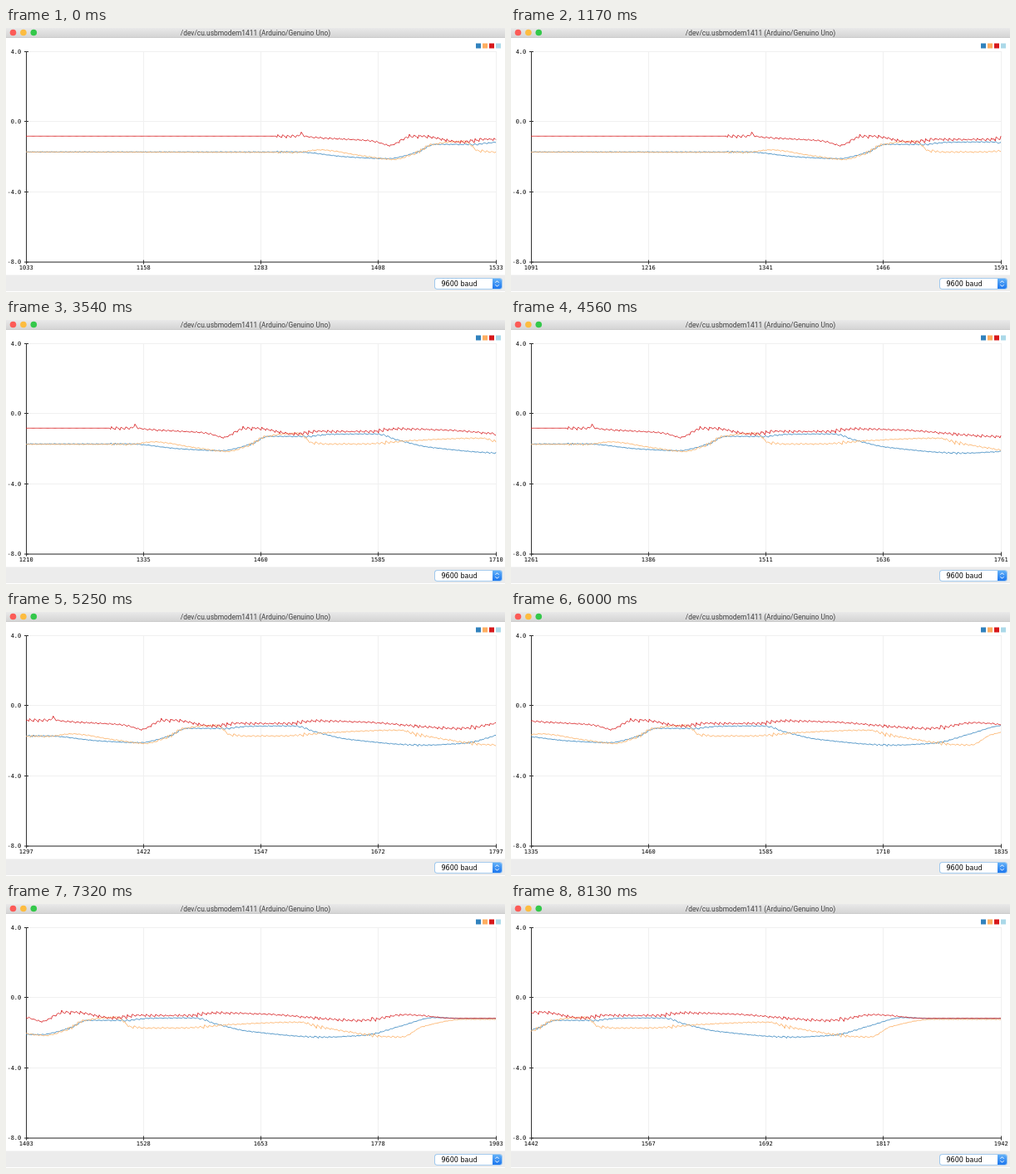
An HTML page with a canvas for the animation above (8.16 s loop, 600 by 318 pixels).

```html
<!DOCTYPE html>
<html lang="en">
<head>
<meta charset="utf-8">
<title>Serial plotter</title>
<style>
html, body { margin: 0; width: 100%; height: 100%; overflow: hidden; background: #fff; }
canvas { display: block; }
</style>
</head>
<body>
<canvas id="stage" width="600" height="318"></canvas>
<script>
const ctx = document.getElementById('stage').getContext('2d');
const LOOP = 8160, STEP = 30;
const LEFT = 24, RIGHT = 589, TOP = 28, BOTTOM = 281.5, SPAN = 500;
const SCALE = (RIGHT - LEFT) / SPAN;
const COLORS = ['#3182bd', '#fdae61', '#d7191c', '#abd9e9'];

// Time in ms and the first sample in view
const scroll = [[0, 1033], [2280, 1146], [4560, 1261], [7320, 1403], [8130, 1442]];

// The sensor moves from START to END and is shaken at each burst
const START = 1300, END = 1860;
const bursts = [1302, 1450, 1512, 1592, 1712, 1772];

// path: turning points as sample and height
const series = [
  {
    shake: .5, idle: .35,
    path: [[1000, 149], [1320, 149], [1375, 155], [1418, 157], [1450, 149], [1468, 139.8], [1508, 140],
      [1535, 137.3], [1582, 137], [1608, 145], [1640, 153], [1720, 160], [1765, 157.5], [1801, 147],
      [1838, 136.5], [1870, 137.7], [1950, 137.7]]
  },
  {
    shake: .8, idle: .35,
    path: [[1000, 149], [1320, 149.5], [1345, 146.5], [1393, 154], [1424, 158], [1446, 151], [1466, 140],
      [1499, 136], [1514, 147], [1530, 149], [1570, 149], [1620, 145], [1695, 142], [1714, 147.5],
      [1803, 160], [1825, 147.5], [1870, 138.6], [1950, 138.6]]
  },
  {
    shake: 1.2, idle: 0,
    path: [[1000, 130], [1323, 130], [1326, 126], [1329, 130], [1402, 136], [1420, 141], [1443, 130],
      [1455, 130], [1495, 137], [1520, 134], [1580, 134], [1600, 131], [1650, 132], [1760, 140],
      [1808, 133], [1860, 137.4], [1950, 137.4]]
  }
];

function segment(points, x) {
  const i = points.findIndex(p => p[0] > x);
  return i < 0 ? points.length - 1 : Math.max(1, i);
}

function linear(points, x) {
  const i = segment(points, x);
  const [x0, y0] = points[i - 1], [x1, y1] = points[i];
  return y0 + (y1 - y0) * (x - x0) / (x1 - x0);
}

// Smooth curve that never overshoots its points
function smooth(points, x) {
  const slope = i => i < 1 || i >= points.length ? 0
    : (points[i][1] - points[i - 1][1]) / (points[i][0] - points[i - 1][0]);
  const tangent = i => {
    const a = slope(i), b = slope(i + 1);
    return a * b > 0 ? 2 * a * b / (a + b) : 0;
  };
  const i = segment(points, x);
  const [x0, y0] = points[i - 1], [x1, y1] = points[i];
  const w = x1 - x0, t = (x - x0) / w, u = 1 - t;
  return y0 * u * u * (1 + 2 * t) + y1 * t * t * (3 - 2 * t)
    + w * t * u * (u * tangent(i - 1) - t * tangent(i));
}

function random(n) {
  const v = Math.sin(n * 127.1) * 43758.5453;
  return v - Math.floor(v);
}

// Rough sawtooth with a period of five samples
function jitter(s, k) {
  const saw = ((s + k * 2) % 5) / 2 - 1;
  return saw * (.4 + .6 * random(Math.floor(s / 5) + k * 91)) + (random(s + k * 1000) - .5) * .8;
}

function noise(s) {
  const sum = bursts.reduce((total, b) => total + 1.8 * Math.exp(-Math.abs(s - b) / 15), .7);
  return s < START ? 0 : sum * Math.min(1, Math.max(.2, (END - s) / 40));
}

function value(k, s) {
  const { path, shake, idle } = series[k];
  return smooth(path, s) + Math.max(idle, shake * noise(s)) * jitter(s, k);
}

function rect(color, x, y, w, h) {
  ctx.fillStyle = color;
  ctx.fillRect(x, y, w, h);
}

function gradient(y0, y1, from, to) {
  const g = ctx.createLinearGradient(0, y0, 0, y1);
  g.addColorStop(0, from);
  g.addColorStop(1, to);
  return g;
}

function text(str, x, y, font, align, color = '#000') {
  ctx.font = font;
  ctx.textAlign = align;
  ctx.fillStyle = color;
  ctx.fillText(str, x, y);
}

function line(points, color, width) {
  ctx.beginPath();
  for (const [x, y] of points) ctx.lineTo(x, y);
  ctx.strokeStyle = color;
  ctx.lineWidth = width;
  ctx.stroke();
}

function box(x, y, w, h, radius, fill) {
  ctx.beginPath();
  ctx.roundRect(x, y, w, h, radius);
  ctx.fillStyle = fill;
  ctx.fill();
}

function drawTitleBar() {
  rect(gradient(0, 12, '#e9e9e9', '#d3d3d3'), 0, 0, 600, 12);
  rect('#c4c4c4', 0, 11.5, 600, .5);
  ['#fc5b57', '#fdbc40', '#34c84a'].forEach((color, i) => {
    ctx.beginPath();
    ctx.arc(8.5 + i * 12.4, 5.5, 3.8, 0, 7);
    ctx.fillStyle = color;
    ctx.fill();
  });
  text('/dev/cu.usbmodem1411 (Arduino/Genuino Uno)', 300, 9.2, '8.4px Roboto, sans-serif', 'center', '#404040');
}

function drawFooter() {
  rect('#ececec', 0, 297.5, 600, 19.5);
  box(515.2, 301.2, 81.6, 13.6, 3, '#8fc1ee');
  box(516, 302, 80, 12, 2.5, '#fff');
  box(585, 302, 11, 12, [0, 2.5, 2.5, 0], gradient(302, 314, '#62b0f8', '#1c76ee'));
  line([[588.5, 306.7], [590.5, 304.7], [592.5, 306.7]], '#fff', 1);
  line([[588.5, 309.3], [590.5, 311.3], [592.5, 309.3]], '#fff', 1);
  text('9600 baud', 523.5, 311, '8px "DejaVu Sans", sans-serif', 'left');
}

function drawAxes(first) {
  const font = '7px "DejaVu Sans Mono", monospace';
  const xs = [0, 1, 2, 3, 4].map(i => Math.floor(LEFT + i * 125 * SCALE));
  const ys = [TOP, 112, 197, BOTTOM];
  xs.slice(1).forEach(x => rect('#f0f0f0', x, TOP, 1, BOTTOM - TOP));
  ys.slice(0, 3).forEach(y => rect('#f0f0f0', LEFT, y, RIGHT - LEFT, 1));
  rect('#333', LEFT, TOP, 1, BOTTOM - TOP);
  rect('#222', LEFT, BOTTOM, RIGHT - LEFT, 1);
  xs.forEach((x, i) => {
    rect('#333', x, 279.5, 1, 5);
    text(first + i * 125, x + .3, 291, font, 'center');
  });
  ys.forEach((y, i) => {
    rect('#333', 22, y, 5, 1);
    text((4 - i * 4).toFixed(1), 18.3, y + 2.6, font, 'right');
  });
}

function drawPlot(first) {
  rect('#fff', 0, 0, 600, 318);
  drawAxes(first);
  COLORS.forEach((color, i) => rect(color, 565 + i * 8, 18.5, 6, 6));
  ctx.lineJoin = 'round';
  series.forEach((_, k) => {
    const points = Array.from({ length: SPAN + 1 }, (_, i) => [LEFT + i * SCALE, value(k, first + i) + .3]);
    line(points, COLORS[k], .85);
  });
}

function frame(now) {
  const t = Math.floor(now % LOOP / STEP) * STEP;
  drawPlot(Math.round(linear(scroll, t)));
  drawTitleBar();
  drawFooter();
  requestAnimationFrame(frame);
}
requestAnimationFrame(frame);
</script>
</body>
</html>
```
